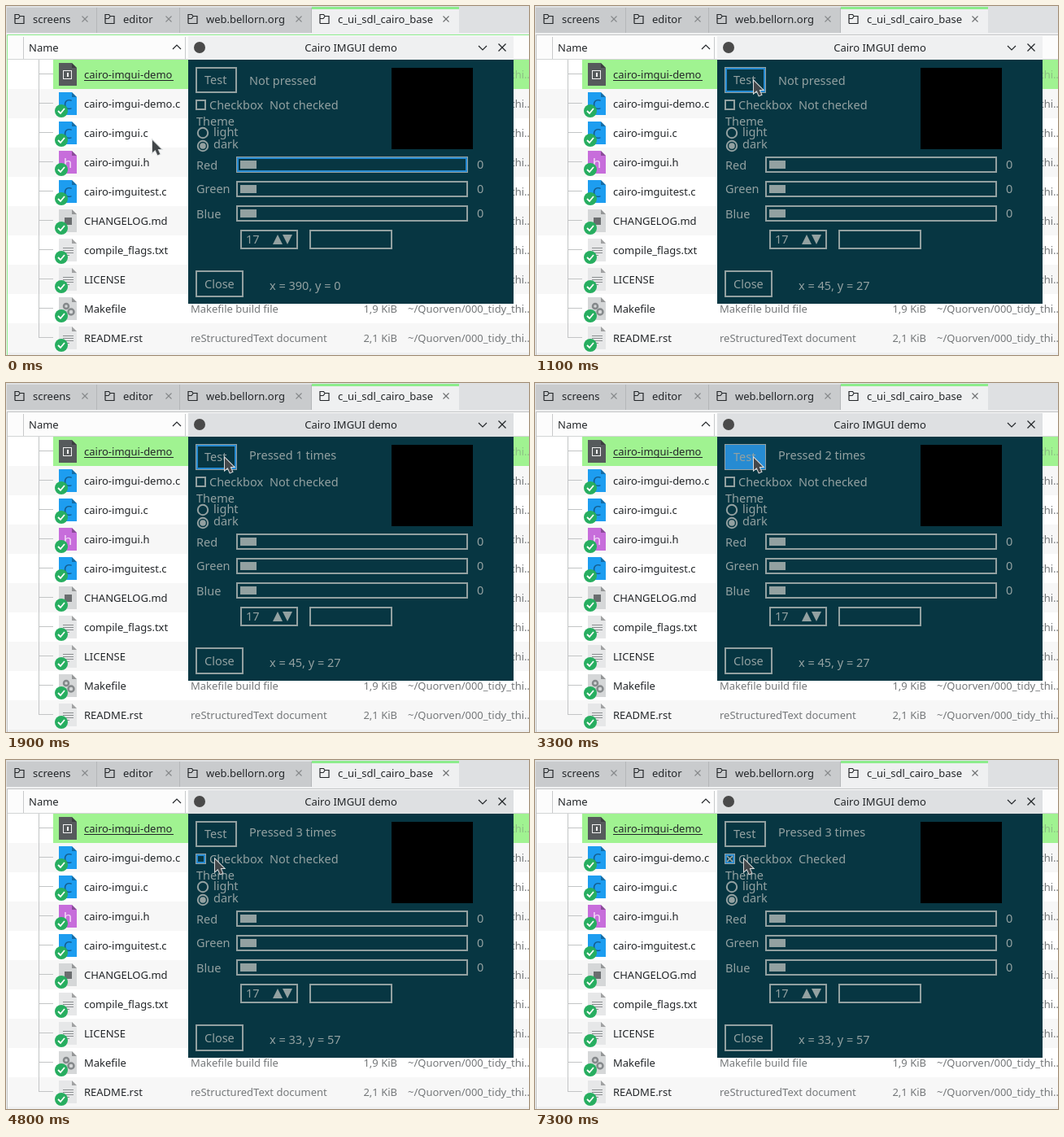
Animation of 643 by 429 pixels, one loop 8000 ms. Source, as an HTML page with a canvas:

```html
<!DOCTYPE html>
<html lang="en">
<head>
<meta charset="utf-8">
<title>Cairo IMGUI demo</title>
<style>
html, body { margin: 0; width: 100%; height: 100%; overflow: hidden; }
canvas { display: block; }
</style>
</head>
<body>
<canvas id="stage" width="643" height="429"></canvas>
<script>
const ctx = document.getElementById('stage').getContext('2d');
const LOOP = 8000;
const INK = '#232629', FADED = '#75787a', BASE = '#073642', GREY = '#93a1a1', BLUE = '#268bd2';

// Pointer positions: [start time, x, y], each held until the next.
const pointerTrack = [
  [0, 180, 165], [600, 187, 159], [700, 203, 145], [800, 226, 123], [900, 247, 105],
  [1000, 263, 95], [1100, 269, 92], [3800, 273, 88], [3900, 276, 86], [4200, 276, 89],
  [4300, 277, 93], [4400, 278, 98], [4500, 278, 102], [4700, 268, 112], [4800, 257, 122]
];
// Mouse clicks: [down, up].
const testClicks = [[1600, 1900], [2300, 2800], [3300, 3400]];
const boxClicks = [[5300, 5500], [6200, 6400], [7200, 7300]];
const isDown = (clicks, t) => clicks.some(([down, up]) => t >= down && t < up);
const countUp = (clicks, t) => clicks.filter(([, up]) => t >= up).length;

const files = [
  ['cairo-imgui-demo', '#565a5c', ''], ['cairo-imgui-demo.c', '#1d9df0', 'C'],
  ['cairo-imgui.c', '#1d9df0', 'C'], ['cairo-imgui.h', '#c76ddb', 'h'],
  ['cairo-imguitest.c', '#1d9df0', 'C'], ['CHANGELOG.md', '#d5d7d8', 'mark'],
  ['compile_flags.txt', '#e6e7e8', 'lines'], ['LICENSE', '#e6e7e8', 'lines'],
  ['Makefile', '#d5d7d8', 'gears'], ['README.rst', '#e6e7e8', 'lines']
];

function rect(x, y, w, h, color) {
  ctx.fillStyle = color;
  ctx.fillRect(x, y, w, h);
}

function frame(x, y, w, h, color = GREY, width = 2) {
  ctx.strokeStyle = color;
  ctx.lineWidth = width;
  ctx.strokeRect(x, y, w, h);
}

// Grey outline; a blue one sits one pixel further in while highlighted.
function widget(x, y, w, h, highlighted, down) {
  frame(x, y, w, h);
  if (down) rect(x, y, w, h, BLUE);
  else if (highlighted) frame(x + 1, y + 1, w - 2, h - 2, BLUE);
}

function text(str, x, y, color = GREY, size = 14.5, align = 'left') {
  ctx.font = `${size}px "Noto Sans", sans-serif`;
  ctx.textAlign = align;
  ctx.fillStyle = color;
  ctx.fillText(str, x, y);
}

function line(points, color, width = 1) {
  ctx.beginPath();
  points.forEach(([x, y]) => ctx.lineTo(x, y));
  ctx.strokeStyle = color;
  ctx.lineWidth = width;
  ctx.stroke();
}

function shape(points, color) {
  ctx.beginPath();
  points.forEach(([x, y]) => ctx.lineTo(x, y));
  ctx.closePath();
  ctx.fillStyle = color;
  ctx.fill();
}

function disc(x, y, r, color) {
  ctx.beginPath();
  ctx.arc(x, y, r, 0, 7);
  ctx.fillStyle = color;
  ctx.fill();
}

function ring(x, y, r, color, width = 2) {
  ctx.beginPath();
  ctx.arc(x, y, r, 0, 7);
  ctx.strokeStyle = color;
  ctx.lineWidth = width;
  ctx.stroke();
}

function cross(x, y, r, color, width) {
  line([[x - r, y - r], [x + r, y + r]], color, width);
  line([[x - r, y + r], [x + r, y - r]], color, width);
}

function tab(x, w, label, closeX, active) {
  rect(x, 2, w, 31, active ? '#eff0f1' : '#c9cbcd');
  if (active) rect(x, 1, w, 3, '#8cec8c');
  else rect(x + w - 1, 2, 1, 31, '#b5b7b9');
  const left = x + 10;
  line([[left, 21.5], [left, 10.5], [left + 4.5, 10.5], [left + 6, 12.5], [left + 11, 12.5],
        [left + 11, 21.5], [left, 21.5]], INK, 1.2);
  line([[left, 15.5], [left + 4, 15.5], [left + 6, 13]], INK, 1.2);
  text(label, x + 32, 21, INK, 13);
  cross(closeX, 16, 3.5, active ? '#6c6f71' : '#85888a', 1.1);
}

function icon(y, color, kind) {
  const top = y - 14;
  shape([[65, top], [81, top], [87, top + 6], [87, top + 28], [65, top + 28]], color);
  shape([[81, top], [87, top + 6], [81, top + 6]], 'rgba(0,0,0,.3)');
  if (kind === 'C' || kind === 'h') {
    text(kind, 76, y + 7, kind === 'C' ? '#145c8c' : '#f3d9f8', 17, 'center');
  } else if (kind === 'lines') {
    for (let i = 0; i < 4; i++) rect(70, y - 3 + i * 3, i === 3 ? 8 : 13, 1, '#8b8e90');
  } else if (kind === 'mark') {
    rect(72, y - 4, 9, 9, '#6a6d6f');
  } else if (kind === 'gears') {
    ring(74, y - 3, 3, '#85898b', 2.5);
    ring(80, y + 4, 3.5, '#85898b', 2.5);
  }
}

function fileRow([name, color, kind], i) {
  const y = 84 + i * 36;
  rect(2, y - 18, 641, 36, i % 2 ? '#f7f7f7' : '#ffffff');
  if (!i) rect(58, y - 18, 585, 36, '#a0f391');
  line([[40, y - .5], [58, y - .5]], '#c3c5c6');
  icon(y, color, kind);
  if (i) {
    disc(68, y + 9, 8, '#27ae60');
    line([[64, y + 9], [67, y + 12], [72, y + 6]], '#fff', 1.8);
  } else {
    frame(70.5, y - 4.5, 10, 10, '#f2f2f2', 1);
    rect(75, y - 2, 2, 5, '#f2f2f2');
    rect(96, 91, 110, 1, INK);
  }
  text(name, 96, y + 5, INK, 13);
  text('~/Quorven/000_tidy_thi…', 494, y + 5, i ? FADED : '#8cbf84', 13);
}

function fileManager(focused) {
  rect(0, 0, 643, 429, '#dee0e2');
  tab(1, 111, 'screens', 97, false);
  tab(112, 102, 'editor', 200, false);
  tab(214, 162, 'web.bellorn.org', 360, false);
  tab(376, 181, 'c_ui_sdl_cairo_base', 541, true);
  rect(0, 33, 643, 396, '#eff0f1');
  files.forEach(fileRow);
  line([[40.5, 66], [40.5, 408]], '#c3c5c6');
  rect(2, 36, 641, 30, '#fcfcfc');
  rect(2, 65, 641, 1, '#d3d5d6');
  rect(21, 38, 1, 27, '#c8cacb');
  rect(220, 38, 1, 27, '#c8cacb');
  const border = focused ? '#8cec8c' : '#c2c4c5';
  rect(1, 35, 642, 1, border);
  rect(1, 35, 1, 394, border);
  text('Name', 28, 56, INK, 13);
  line([[205, 53], [210, 48], [215, 53]], INK, 1.2);
  text('Makefile build file', 227, 377, FADED, 13);
  text('reStructuredText document', 227, 413, FADED, 13);
  text('1,9 KiB', 481, 377, FADED, 13, 'right');
  text('2,1 KiB', 481, 413, FADED, 13, 'right');
}

function button(label, y, w, h, hover, down) {
  widget(234, y, w, h, hover, down);
  text(label, 244, y + h - 10);
}

function slider(label, y, labelY, focus) {
  text(label, 234, labelY);
  widget(284, y - 9, 283, 18, focus);
  rect(288, y - 5, 20, 10, GREY);
  text('0', 579, y + 5);
}

function demoWindow(t, x, y) {
  const titleColor = t < 1600 ? '#eff0f1' : t < 1700 ? '#e5e7e9' : '#dee0e2';
  rect(224, 37, 400, 29, titleColor);
  disc(238, 51, 7, '#4a4a4a');
  text('Cairo IMGUI demo', 424, 56, INK, 13, 'center');
  line([[581, 49], [586, 54], [591, 49]], INK, 1.2);
  cross(610, 51, 4.5, INK, 1.2);
  rect(224, 66, 400, 300, BASE);

  const inside = x >= 224;
  const onTest = x >= 234 && x < 284 && y >= 76 && y < 107;
  const onBox = x >= 234 && x < 318 && y >= 116 && y < 128;

  const presses = countUp(testClicks, t);
  button('Test', 76, 49, 30, onTest, isDown(testClicks, t));
  if (presses) text(`Pressed ${presses} times`, 299, 94);
  else text('Not pressed', 299, 97);

  const checked = countUp(boxClicks, t) % 2;
  widget(234, 116, 11, 11, onBox, isDown(boxClicks, t));
  if (checked) cross(239.5, 121.5, 3.6, GREY, 1.8);
  text('Checkbox', 250, 127);
  text(checked ? 'Checked' : 'Not checked', 324, 127);

  text('Theme', 234, 147);
  ring(242, 156, 6.2, GREY);
  ring(242, 172, 6.2, GREY);
  disc(242, 172, 3.8, GREY);
  text('light', 255, 160);
  text('dark', 255, 175);
  rect(474, 76, 100, 100, '#000');

  slider('Red', 195, 201, t < 900);
  slider('Green', 225, 230, false);
  slider('Blue', 255, 261, false);

  widget(289, 276, 69, 22);
  text('17', 295, 292);
  shape([[328, 293], [334, 281], [340, 293]], GREY);
  shape([[340, 281], [352, 281], [346, 293]], GREY);
  widget(374, 276, 100, 22);

  button('Close', 326, 57, 31, false, false);
  text(inside ? `x = ${x - 224}, y = ${y - 65}` : 'x = 390, y = 0', 324, 349);
}

function pointer(x, y) {
  const outline = [[0, 0], [0, 15], [3.6, 12], [6.4, 18.3], [9.3, 17], [6.6, 11], [11, 11]]
    .map(([dx, dy]) => [x + dx, y + dy]);
  line([...outline, outline[0], outline[1]], '#d9dcdd', 2);
  shape(outline, '#43474a');
}

function draw() {
  const t = performance.now() % LOOP;
  const [, x, y] = pointerTrack.findLast(([start]) => t >= start);
  fileManager(t < 600);
  demoWindow(t, x, y);
  pointer(x, y);
  requestAnimationFrame(draw);
}
draw();
</script>
</body>
</html>
```
